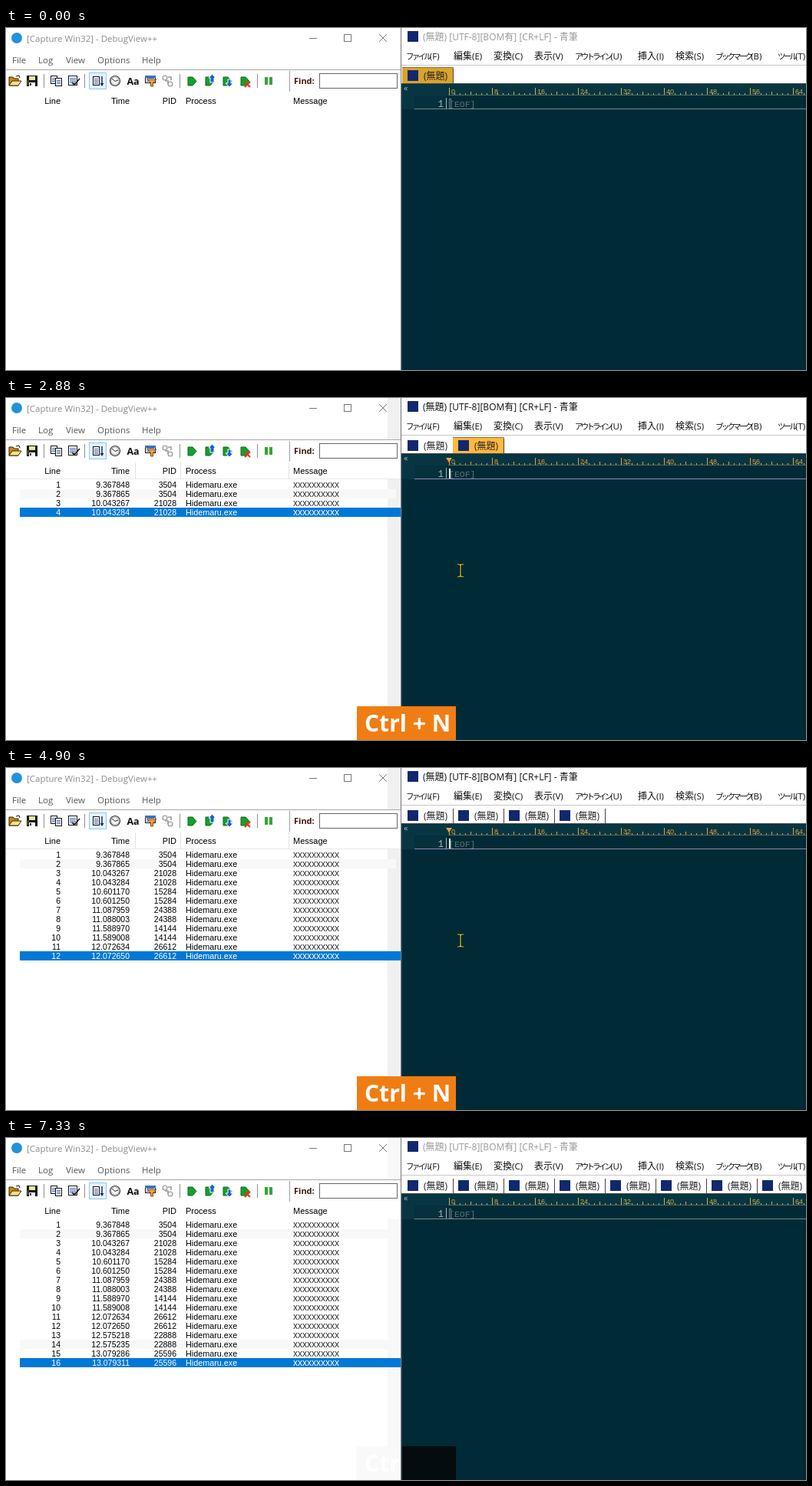
Write an HTML page with a canvas that moves like this. It is 1042 px wide and 446 px high and loops after 7380 ms.

```html
<!DOCTYPE html>
<html lang="ja">
<head>
<meta charset="utf-8">
<title>Log viewer and editor</title>
<style>
html, body { margin: 0; width: 100%; height: 100%; overflow: hidden; background: #fff; }
canvas { display: block; }
</style>
</head>
<body>
<canvas id="stage" width="1042" height="446"></canvas>
<script>
const c = document.getElementById('stage').getContext('2d');
const LOOP = 7380, FOCUS = 320, FIRST_KEY = 1990, BLUR = 7330;
const UI = '"Open Sans", "Noto Sans CJK JP", "Noto Sans CJK", sans-serif';
const GRID = '"Liberation Sans", Arial, sans-serif';
const MONO = '"Liberation Mono", monospace';
const NAVY = '#12286e', GREEN = '#16a02c', BLUE = '#1d5fd0', ORANGE = '#f07d14';

// key down, pointer back, log rows added, tab added
const presses = [
  [1990, 2180, 2180, 2230], [2700, 2880, 2880, 2930],
  [3210, 3400, 3450, 3500], [3680, 3960, 3960, 4020],
  [4200, 4390, 4430, 4480], [4710, 4860, 4900, 4950],
  [5190, 5370, 5420, 5460], [5690, 5830, 5880, 5980]
];

// process id and the two time stamps of each new window
const log = [
  [3504, '9.367848', '9.367865'], [21028, '10.043267', '10.043284'],
  [15284, '10.601170', '10.601250'], [24388, '11.087959', '11.088003'],
  [14144, '11.588970', '11.589008'], [26612, '12.072634', '12.072650'],
  [22888, '12.575218', '12.575235'], [25596, '13.079286', '13.079311']
];

function box(x, y, w, h, color) {
  c.fillStyle = color;
  c.fillRect(x, y, w, h);
}

function frame(x, y, w, h, color) {
  c.strokeStyle = color;
  c.lineWidth = 1;
  c.strokeRect(x + .5, y + .5, w - 1, h - 1);
}

function text(s, x, y, font, color, align = 'left') {
  c.font = font;
  c.fillStyle = color;
  c.textAlign = align;
  c.fillText(s, x, y);
}

function line(points, color, width = 1) {
  c.strokeStyle = color;
  c.lineWidth = width;
  c.beginPath();
  points.forEach(([x, y], i) => i ? c.lineTo(x, y) : c.moveTo(x, y));
  c.stroke();
}

function poly(points, color, edge) {
  c.beginPath();
  points.forEach(([x, y]) => c.lineTo(x, y));
  c.closePath();
  c.fillStyle = color;
  c.fill();
  if (edge) {
    c.strokeStyle = edge;
    c.lineWidth = 1;
    c.stroke();
  }
}

function disc(x, y, r, color, edge) {
  c.beginPath();
  c.arc(x, y, r, 0, Math.PI * 2);
  c.fillStyle = color;
  c.fill();
  if (edge) {
    c.strokeStyle = edge;
    c.lineWidth = 1.2;
    c.stroke();
  }
}

function page(x, y, w, h) {
  box(x, y, w, h, '#fff');
  frame(x, y, w, h, '#111');
  for (let i = 3; i < h - 2; i += 2) box(x + 2, y + i, w - 4, 1, '#4a68a8');
}

function arrow(x) {
  poly([[x - 5, 64], [x + 1, 64], [x + 6, 69.5], [x + 1, 75], [x - 5, 75]], GREEN, '#0b6b1c');
}

function toolbar() {
  poly([[4, 75], [4, 64], [9, 64], [11, 66], [16, 66], [16, 75]], '#c98a16', '#3a2600');
  poly([[4, 75], [8, 69], [20, 69], [16, 75]], '#ffe08a', '#3a2600');
  line([[13, 63], [17, 62], [18, 65]], '#111');

  box(27, 62, 14, 14, '#111');
  box(30, 63, 8, 5, '#e6e6a0');
  box(30, 71, 8, 5, '#fff');
  box(31, 72, 2, 3, '#111');
  box(28, 68, 1, 6, '#7a8a20');

  page(58, 62, 9, 11);
  page(64, 65, 9, 11);

  page(81, 62, 12, 13);
  line([[86, 71], [89, 74], [96, 66]], '#111', 1.6);

  box(108, 58, 23, 22, '#e5f3ff');
  frame(108, 58, 23, 22, '#8cc8f4');
  page(113, 63, 9, 12);
  line([[125, 63], [125, 74]], NAVY, 1.4);
  poly([[122.5, 72], [127.5, 72], [125, 76]], NAVY);

  disc(142, 69, 6.5, '#fff', '#333');
  for (let i = 0; i < 12; i++) {
    const a = i * Math.PI / 6;
    box(141.5 + 4.8 * Math.cos(a), 68.5 + 4.8 * Math.sin(a), 1, 1, '#333');
  }
  line([[138, 66], [142, 69.5], [146, 68]], '#222');

  text('Aa', 157.5, 73.5, `bold 12.5px ${UI}`, '#111');

  page(181, 62, 14, 10);
  box(181, 62, 14, 3, '#3873c8');
  poly([[184, 67], [196, 67], [191.5, 71], [191.5, 76], [188.5, 76], [188.5, 71]], '#f3a43b', '#8a4a10');

  disc(207, 65, 3, '#eee', '#999');
  disc(214, 73, 3, '#eee', '#999');
  line([[207, 69], [211, 69], [211, 73]], '#999', 1.6);
  line([[211, 64], [215, 64], [215, 68]], '#999', 1.6);

  [242, 265, 288, 311].forEach(arrow);
  poly([[266, 67], [266, 65], [264, 65], [268.5, 60], [273, 65], [271, 65], [271, 71], [266, 71]], BLUE, '#fff');
  poly([[289, 67], [293, 67], [293, 72], [296, 72], [291, 77], [286, 72], [289, 72]], BLUE, '#fff');
  line([[311, 70], [318, 77]], '#e03818', 2.2);
  line([[318, 70], [311, 77]], '#e03818', 2.2);

  box(337, 64, 4, 10, '#36a636');
  box(343, 64, 4, 10, '#36a636');

  [49, 102, 226, 327].forEach(x => box(x, 60, 1, 18, '#909090'));
  box(369, 56, 1, 27, '#a0a0a0');
  text('Find:', 375, 73, `bold 11px ${UI}`, '#401810');
  box(408, 59, 102, 20, '#fff');
  frame(408, 59, 102, 20, '#666');
}

function viewer(t, rows) {
  box(0, 0, 514, 446, '#fff');
  if (t >= FOCUS) {
    const shade = t < BLUR ? '#f0f0f0' : '#f8f8f8';
    box(497, 0, 17, 54, shade);
    box(497, 106, 17, 340, shade);
  }

  disc(14, 13, 7, '#2492d8');
  text('[Capture Win32] - DebugView++', 27, 18, `11.5px ${UI}`, '#8b8b8b');
  box(395, 13, 10, 1, '#777');
  frame(440, 8, 10, 10, '#777');
  line([[486, 8], [496, 18]], '#777');
  line([[496, 8], [486, 18]], '#777');

  [['File', 8], ['Log', 42], ['View', 78], ['Options', 119], ['Help', 177]]
    .forEach(([s, x]) => text(s, x, 46, `11.5px ${UI}`, '#555'));
  box(0, 54, 514, 1, '#a8a8a8');
  toolbar();

  const head = `11px ${GRID}`;
  text('Line', 71, 99, head, '#000', 'right');
  text('Time', 161, 99, head, '#000', 'right');
  text('PID', 222, 99, head, '#000', 'right');
  text('Process', 234, 99, head, '#000');
  text('Message', 374, 99, head, '#000');
  if (t >= FIRST_KEY && t < 6870) {
    [168, 227, 368].forEach(x => box(x, 84, 1, 21, '#e2e2e2'));
    box(0, 105, 514, 1, '#e8e8e8');
  }

  for (let i = 0; i < rows; i++) {
    const last = i === rows - 1, y = 117 + 12 * i;
    const [pid, ...stamps] = log[i >> 1];
    const ink = last ? '#fff' : '#000';
    if (last) box(18, y - 10, 496, 12, '#0078d7');
    else if (i === 1 || i === 13) box(18, y - 10, 490, 12, '#f8f8f8');
    text(i + 1, 71, y, `10.5px ${GRID}`, ink, 'right');
    text(stamps[i % 2], 161, y, `10.5px ${GRID}`, ink, 'right');
    text(pid, 222, y, `10.5px ${GRID}`, ink, 'right');
    text('Hidemaru.exe', 234, y, `10.8px ${GRID}`, ink);
    text('xxxxxxxxxx', 374, y, `12px ${GRID}`, last ? '#fff' : '#333');
  }
}

// kana are set tighter than kanji, as in a proportional UI font
function menuItem(label, key, x) {
  const kana = /^[ァ-ー]/.test(label);
  c.letterSpacing = kana ? '-2.8px' : '0px';
  text(label, x, 41, `${kana ? 10.5 : 12}px ${UI}`, '#111');
  x += c.measureText(label).width;
  c.letterSpacing = '0px';
  text(`(${key})`, x, 41, `11.5px ${UI}`, '#111');
}

function tabs(count, open) {
  box(516, 51, 526, 21, '#fff');
  for (let i = 0; i < count; i++) {
    const x = 516 + 66 * i;
    if (i === open) {
      box(x, 51, 67, 21, open ? '#ffb83e' : '#d8a42c');
      box(x, 51, 67, 1, '#8a7340');
    }
    box(x + 66, 53, 1, 19, '#444');
    box(x + 7, 55, 14, 14, NAVY);
    text('(無題)', x + 28, 67, `12px ${UI}`, '#222');
  }
  box(515, 72, 527, 1, '#4a4a4a');
}

function editor(active, count, open) {
  box(514, 0, 528, 51, '#fff');
  box(523, 4, 14, 14, NAVY);
  text('(無題) [UTF-8][BOM有] [CR+LF] - 青筆', 543, 16, `12px ${UI}`, active ? '#111' : '#999');
  [['ファイル', 'F', 521], ['編集', 'E', 583], ['変換', 'C', 635], ['表示', 'V', 688],
   ['アウトライン', 'U', 741], ['挿入', 'I', 823], ['検索', 'S', 872],
   ['ブックマーク', 'B', 924], ['ツール', 'T', 1005]].forEach(m => menuItem(...m));
  box(515, 48, 527, 1, '#c8c8c8');
  tabs(count, open);

  box(516, 73, 526, 373, '#002b36');
  box(516, 73, 526, 15, '#073642');
  box(516, 88, 16, 18, '#073642');
  box(532, 88, 42, 17, '#06303c');
  text('«', 518, 82, `11px ${UI}`, '#a9bcc0');

  const ink = active ? '#e3a03a' : '#c8b04a';
  for (let i = 0; i * 7 + 577 < 1042; i++) {
    const x = 577 + 7 * i, major = i % 8 === 0;
    const h = major ? 10 : i % 4 === 0 ? 5 : 3;
    box(x, 88 - h, 1, h, ink);
    if (major) text(i, x + 3, 86, `9px ${GRID}`, ink);
  }
  box(576, 87, 466, 1, '#56685a');
  text('1', 570, 103, `12px ${MONO}`, '#9fb6c0', 'right');
  box(573, 91, 1, 14, '#a8b8bc');
  text('[EOF]', 577, 103, `11.5px ${MONO}`, '#5c7076');
  box(532, 105, 510, 1, active ? '#9088b8' : '#74888e');
  if (active) {
    poly([[573, 78], [581, 78], [577, 84]], '#f0a030');
    box(577, 92, 2, 13, '#eee');
  } else {
    frame(577, 92, 3, 13, '#687c82');
  }
  box(514, 0, 1, 446, '#777');
  box(515, 73, 1, 373, '#164450');
}

function beam(x, y, color) {
  const draw = (ink, w) => {
    line([[x - 4, y - 8], [x - 1, y - 8], [x, y - 7], [x + 1, y - 8], [x + 4, y - 8]], ink, w);
    line([[x, y - 7], [x, y + 7]], ink, w);
    line([[x - 4, y + 8], [x - 1, y + 8], [x, y + 7], [x + 1, y + 8], [x + 4, y + 8]], ink, w);
  };
  draw('#041418', 3);
  draw(color, 1.2);
}

function pointer(t) {
  if (t < 80 || t >= BLUR) return;
  const left = Math.pow(1 - Math.min(1, (t - 80) / 290), 2);
  const hidden = presses.some(([down, back]) => t >= down && t < back);
  beam(592 + 50 * left, 225 + 215 * left, hidden ? '#06161a' : '#e0d030');
}

function keyCaption(t) {
  if (t < FIRST_KEY) return;
  const label = color => text('Ctrl + N', 467, 435, `bold 30px ${UI}`, color);
  if (t >= 6580) {
    box(457, 402, 57, 44, '#f9f9f9');
    c.save();
    c.beginPath();
    c.rect(457, 402, 57, 44);
    c.clip();
    label('#fff');
    c.restore();
    box(516, 402, 70, 44, '#040c0f');
  }
  c.globalAlpha = Math.max(0, Math.min(1, 1 - (t - 6530) / 340));
  box(457, 402, 129, 44, ORANGE);
  label('#fff');
  c.globalAlpha = 1;
}

function draw(t) {
  const logged = presses.filter(p => t >= p[2]).length;
  const opened = 1 + presses.filter(p => t >= p[3]).length;
  // the tab bar briefly loses its last two tabs while it is rebuilt
  const rebuild = presses.some(([, back, rows, tab]) => rows > back && t >= rows && t < tab);
  viewer(t, logged * 2);
  editor(t >= FOCUS && t < BLUR, rebuild ? opened - 2 : opened, opened - 1);
  pointer(t);
  keyCaption(t);
}

const start = performance.now();
function tick() {
  draw((performance.now() - start) % LOOP);
  requestAnimationFrame(tick);
}
tick();
</script>
</body>
</html>
```
